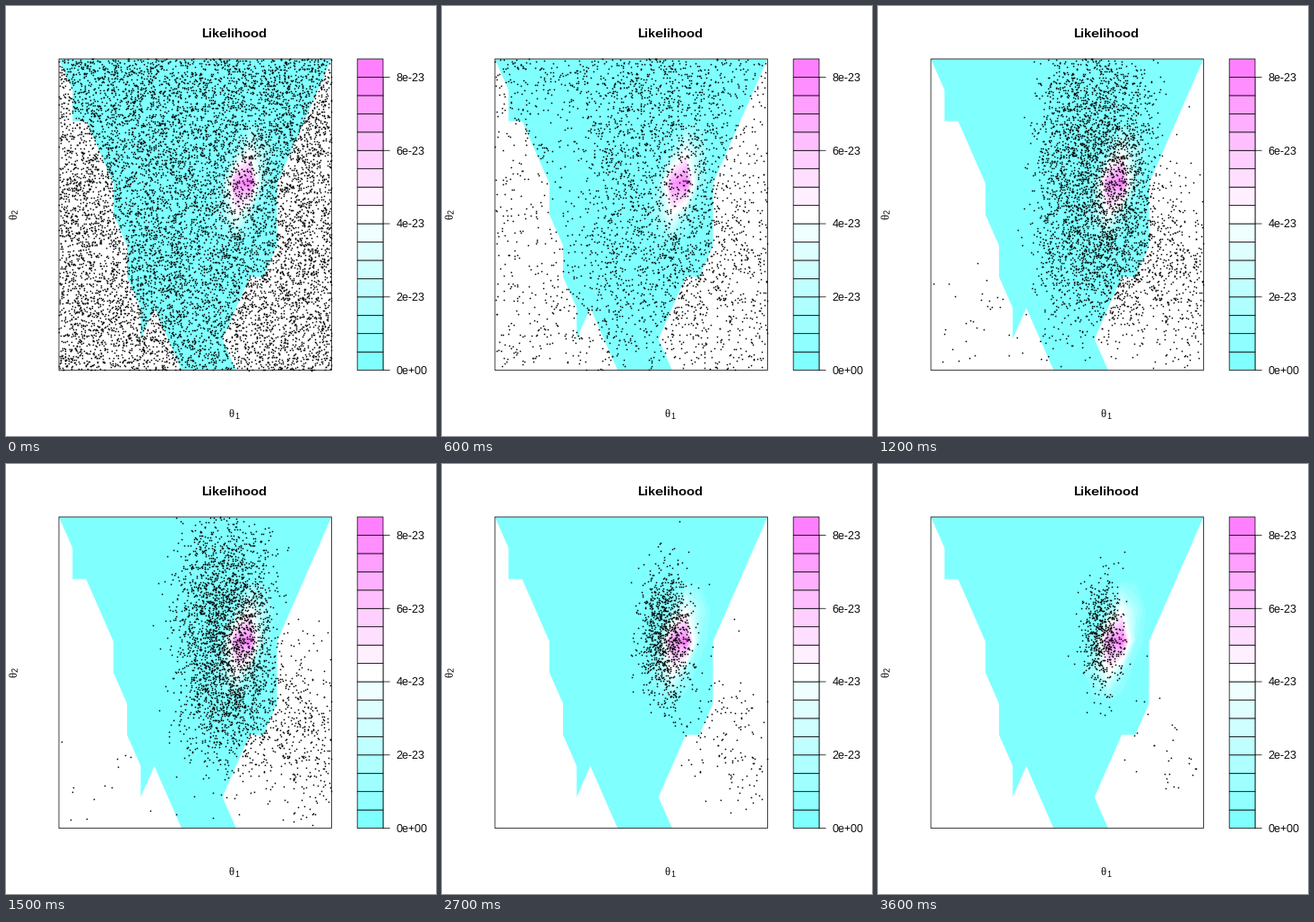
A matplotlib script that plays this animation: 480x480 px, repeating every 3900 ms.

```python
import numpy as np
import matplotlib.pyplot as plt
from matplotlib.animation import FuncAnimation
from matplotlib.patches import Polygon, Rectangle

SIZE, DPI = 480, 72
FRAMES, INTERVAL = 13, 300
LINE = 14.4                                    # one margin line in pixels
L, T = 4.1 * LINE, 4.1 * LINE                  # plot box
R, B = 363.36, SIZE - 5.1 * LINE
KL, KR = R + 2 * LINE, SIZE - 4.1 * LINE       # colour key
MID = 254.4
BANDS, STROKE = 17, 0.75
SANS, SERIF = "Liberation Sans", "Liberation Serif"

plt.rcParams.update({"text.hinting": "native", "text.hinting_factor": 1})
fig = plt.figure(figsize=(SIZE / DPI, SIZE / DPI), dpi=DPI, facecolor="white")
ax = fig.add_axes([0, 0, 1, 1])
ax.axis("off")


def shade(i):
    """Band colour from cyan through white to magenta."""
    s = (i - BANDS // 2) / (BANDS - 1)
    return (1 + min(s, 0), 1 - max(s, 0), 1)


def box(x0, y0, x1, y1, fill="none"):
    ax.add_patch(Rectangle((x0, y0), x1 - x0, y1 - y0, fc=fill, ec="black",
                           lw=STROKE, zorder=4, snap=False))


def line(x0, y0, x1, y1):
    ax.plot([x0, x1], [y0, y1], color="black", lw=STROKE, snap=False)


def label(x, y, s, size=12, font=SANS, **kw):
    ax.text(x, y, s, fontsize=size, family=font, rotation_mode="anchor", **kw)


# Likelihood: a tilted bell on a coarse grid, zero over the support
gx, gy = np.linspace(L, R, 21), np.linspace(T, B, 11)
SUPPORT = [(0, 0), (1, 1), (1, 2), (2, 2), (4, 4), (4, 5), (5, 6), (5, 7),
           (6, 8), (6, 9), (7, 8), (9, 10), (13, 10), (12, 9), (14, 7),
           (15, 7), (16, 6), (16, 4), (20, 0)]
ax.add_patch(Polygon([(gx[i], gy[j]) for i, j in SUPPORT],
                     fc=shade(0), ec="none", zorder=1))
u, v = np.meshgrid(np.arange(21) - 13.55, np.arange(11) - 4)
z = 10.3 * np.exp(-1.1 * u ** 2 - 1.27 * u * v - 1.3 * v ** 2)
ax.contourf(gx, gy, z, levels=np.arange(1, BANDS + 1) / 2,
            colors=[shade(i) for i in range(1, BANDS)], zorder=2)

box(L, T, R, B)
band = (B - T) / BANDS
for i in range(BANDS):
    box(KL, B - (i + 1) * band, KR, B - i * band, shade(i))
line(KR, B, KR, B - 16 * band)
for e in range(0, 9, 2):
    y = B - 2 * e * band
    line(KR, y, KR + LINE / 2, y)
    label(KR + LINE, y + 4.4, f"{e}e-23" if e else "0e+00")

label(MID, 35, "Likelihood", 14.4, weight="bold", ha="center")
label(248.9, 459, "θ", font=SERIF)
label(255.2, 461, "1", 9)
label(12, 238.3, "θ", font=SERIF, rotation=90)
label(14, 232, "2", 9, rotation=90)

# Candidate particles; each shows while its rank is below the local density
POOL = 0.32
rng = np.random.default_rng(7)
n = int(POOL * (R - L) * (B - T))
px, py = rng.uniform(L, R, n), rng.uniform(T, B, n)
rank = rng.uniform(0, POOL, n)


def bell(cx, cy, sx, sy, power=2, shear=0):
    dx = px - cx
    dy = py - cy - shear * dx
    return np.exp(-0.5 * (np.abs(dx / sx) ** power + np.abs(dy / sy) ** power))


def density(k):
    if k == 0:
        return np.full(n, 0.095)
    prior = np.clip((3 - k) / 2, 0, 1)
    s = min(1, np.exp((3 - k) / 2.8))          # spread, decays with each step
    side = (px - (L + R) / 2) / (R - L) * 2
    spread = (0.018 + 0.01 * side ** 2
              + 0.035 * np.exp(-((py - T) / 48) ** 2) * (1 - 0.45 * side))
    core = (0.3 - 0.21 * s) * bell(251 - 13 * s, 190 + 10 * s, 10 + 49 * s,
                                   26 + 124 * s, 2 + 2 * s)
    tail = 0.055 * np.exp(-(k - 4) ** 2 / 24) * bell(
        325, 281 + 3 * k, 28 + 17 * s, 38 + 27 * s, shear=0.6)
    corner = 0.014 * s ** 2 * bell(65, 400, 35 + 45 * s, 25 + 35 * s)
    return prior * spread + (1 - prior) * (core + tail + corner)


dots = ax.scatter([], [], s=1.5 ** 2, marker="s", c="black", linewidths=0,
                  antialiased=False, snap=False, zorder=5)
ax.set_xlim(0, SIZE)
ax.set_ylim(SIZE, 0)


def update(k):
    on = rank < density(k)
    dots.set_offsets(np.column_stack([px[on], py[on]]))
    return dots,


anim = FuncAnimation(fig, update, frames=FRAMES, interval=INTERVAL,
                     repeat=True, repeat_delay=0)
plt.show()
```
